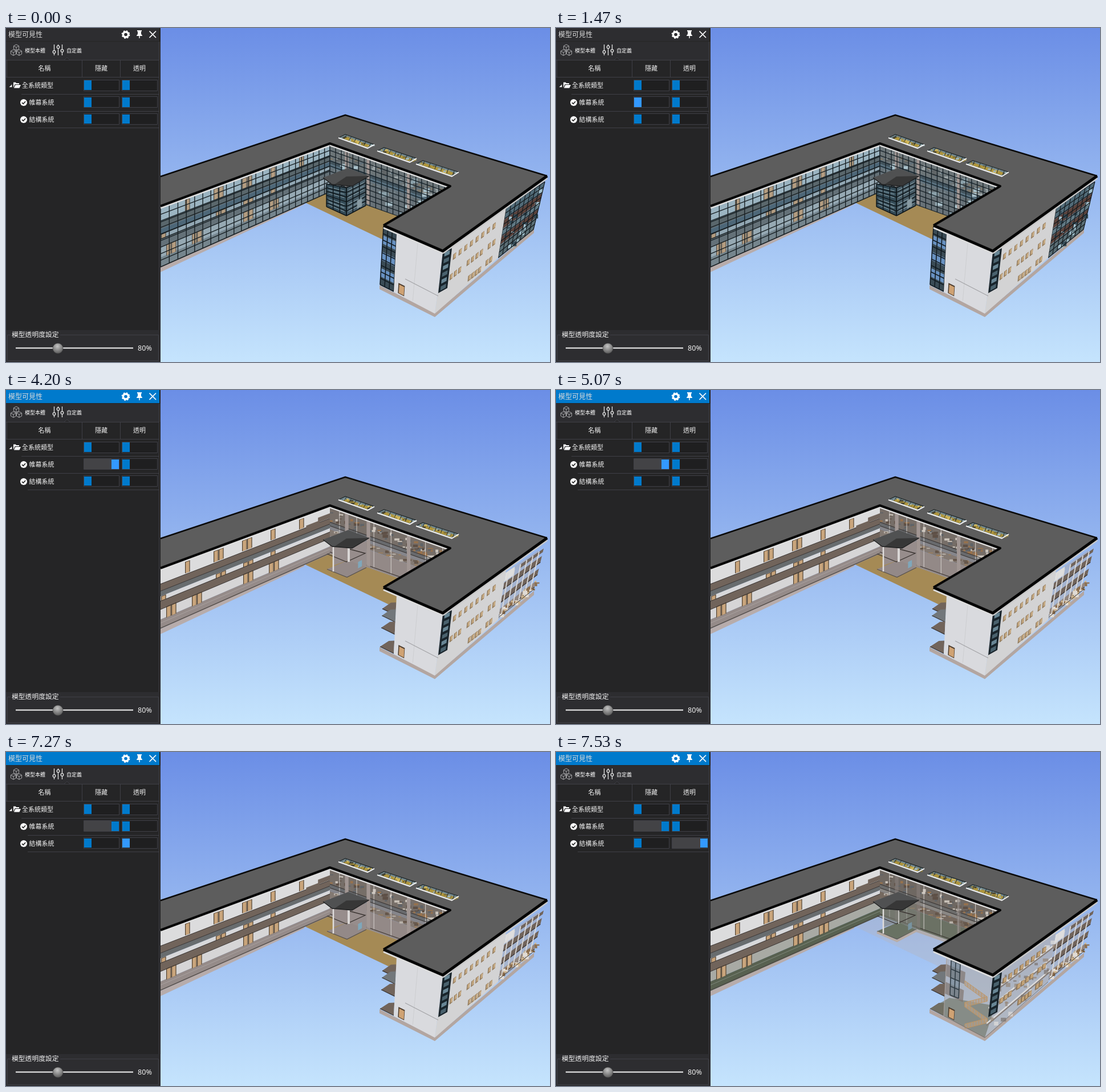
Recreate the animation shown at these times as an HTML page with a canvas. Size 954x587 px, loop 8000 ms.

```html
<!DOCTYPE html>
<html lang="zh-Hant">
<head>
<meta charset="utf-8">
<title>模型可見性</title>
<style>
html, body { margin: 0; width: 100%; height: 100%; overflow: hidden; background: #252526; }
canvas, svg { position: absolute; left: 0; top: 0; }
text { font-family: "Noto Sans CJK TC", "Noto Sans CJK", "Noto Sans", sans-serif; fill: #f1f1f1; font-size: 11px; }
.title { font-size: 12px; fill: #dcdcdc; }
.tab { font-size: 9px; font-weight: 500; fill: #fff; }
.mid { text-anchor: middle; }
.line { fill: none; stroke: #3f3f46; }
.knob { fill: #007acc; }
.trail { fill: #434346; transform-box: fill-box; transform-origin: 0 0; }

#bare, #clear, #bar, .knob, .trail { animation: 8s step-end infinite; }
#bare { animation-name: bare; }
#clear { animation-name: clear; }
#bar { animation-name: focus; }
#k1 { animation-name: hover1, slide1; }
#k2 { animation-name: hover2, slide2; }
#t1 { animation-name: grow1; }
#t2 { animation-name: grow2; }
@keyframes bare { 0% { opacity: 0 } 49.9%, 100% { opacity: 1 } }
@keyframes clear { 0% { opacity: 0 } 91.5%, 100% { opacity: 1 } }
@keyframes focus { 0% { fill: #2d2d30 } 49.9%, 100% { fill: #007acc } }
@keyframes hover1 { 0% { fill: #007acc } 17.4% { fill: #1a8ae6 } 18.3% { fill: #39f } 73.3%, 100% { fill: #007acc } }
@keyframes hover2 { 0% { fill: #007acc } 74%, 100% { fill: #39f } }
@keyframes slide1 {
  0%, 49.9% { transform: translateX(0); animation-timing-function: steps(3) }
  52.4%, 100% { transform: translateX(48px) }
}
@keyframes grow1 {
  0%, 49.9% { transform: scaleX(0); animation-timing-function: steps(3) }
  52.4%, 100% { transform: scaleX(1) }
}
@keyframes slide2 {
  0%, 90.8% { transform: translateX(0); animation-timing-function: steps(4) }
  94%, 100% { transform: translateX(49px) }
}
@keyframes grow2 {
  0%, 90.8% { transform: scaleX(0); animation-timing-function: steps(4) }
  94%, 100% { transform: scaleX(1) }
}
</style>
</head>
<body>
<canvas id="full" width="954" height="587"></canvas>
<canvas id="bare" width="954" height="587"></canvas>
<canvas id="clear" width="954" height="587"></canvas>

<svg width="271" height="587" viewBox="0 0 271 587">
  <defs>
    <radialGradient id="ball" cx=".45" cy=".3" r=".7">
      <stop offset="0" stop-color="#c4c4c4"/><stop offset=".55" stop-color="#8a8a8a"/><stop offset="1" stop-color="#5c5c5c"/>
    </radialGradient>
    <path id="cube" d="M0-5 4.6-2.5V2.8L0 5.3-4.6 2.8V-2.5ZM-4.6-2.5 0 0 4.6-2.5M0 0V5.3"/>
    <path id="slot" d="M.5.5h62v19h-62z" fill="#1f1f20" stroke="#3f3f46"/>
    <g id="check">
      <circle r="6" fill="#fff"/>
      <path d="M-3 0-.8 2.3 3.2-2" fill="none" stroke="#222" stroke-width="1.6"/>
    </g>
    <g id="slots"><use href="#slot" x="136"/><use href="#slot" x="203"/></g>
  </defs>
  <rect width="271" height="587" fill="#252526"/>
  <rect y="24" width="271" height="32" fill="#2d2d30"/>
  <rect y="531" width="271" height="56" fill="#2d2d30"/>
  <rect id="bar" width="269" height="23" fill="#2d2d30"/>

  <text class="title" x="4" y="15.5">模型可見性</text>
  <g fill="none" stroke="#fff">
    <circle cx="210" cy="11.5" r="4.5" stroke-width="3.4"/>
    <circle cx="210" cy="11.5" r="6.4" stroke-width="2" stroke-dasharray="2.6 2.43"/>
    <path d="M251.5 5.500 263 17M263 5.500 251.5 17" stroke-width="1.7"/>
  </g>
  <path d="M230 4h8v2h-1v5q2 1 2 3h-4.300v4h-1.400v-4H229q0-2 2-3V6h-1z" fill="#fff"/>

  <g fill="none" stroke="#a8a8aa">
    <use href="#cube" x="18" y="34"/><use href="#cube" x="13" y="43"/><use href="#cube" x="23" y="43"/>
  </g>
  <text class="tab" x="33" y="42.5">模型本體</text>
  <g fill="#2d2d30" stroke="#e4e4e4" stroke-width="1.3">
    <path d="M84.5 29v19M91.5 29v19M98.5 29v19"/>
    <circle cx="84.5" cy="42" r="2.3"/><circle cx="91.5" cy="33.5" r="2.3"/><circle cx="98.5" cy="40" r="2.3"/>
  </g>
  <text class="tab" x="106" y="42.5">自定義</text>
  <path d="M102 56l5-4 5 4" fill="#252526" stroke="#3f3f46"/>

  <path class="line" d="M0 56.500H268M1.500 57V86M133.500 57V86M200.500 57V86M268.500 24V531M0 86.500H268M27 116.500H268M38 146.500H268M38 175.500H268"/>
  <text class="mid" x="67.5" y="75">名稱</text>
  <text class="mid" x="167" y="75">隱藏</text>
  <text class="mid" x="234" y="75">透明</text>

  <path d="M10.500 99v5h-5z" fill="#e8e8e8"/>
  <path d="M13 105V95.500h4l1 1.500h5v2h-7.500zM16.500 100H26l-2.500 5.500H14z" fill="#fff"/>
  <text x="28" y="104.5">全系統類型</text>
  <use href="#check" x="31" y="131"/>
  <text x="40.5" y="134.5">帷幕系統</text>
  <use href="#check" x="31" y="161"/>
  <text x="40.5" y="164.5">結構系統</text>

  <use href="#slots" y="91"/><use href="#slots" y="120"/><use href="#slots" y="150"/>
  <rect id="t1" class="trail" x="137" y="121" width="48" height="18"/>
  <rect id="t2" class="trail" x="204" y="151" width="49" height="18"/>
  <rect class="knob" x="137" y="92" width="13" height="17"/>
  <rect class="knob" x="204" y="92" width="13" height="17"/>
  <rect class="knob" x="137" y="122" width="13" height="17" id="k1"/>
  <rect class="knob" x="204" y="122" width="13" height="17"/>
  <rect class="knob" x="137" y="152" width="13" height="16"/>
  <rect class="knob" x="204" y="152" width="13" height="16" id="k2"/>

  <path class="line" d="M8 539.500H2.500V584.500H267.500V539.500H95"/>
  <text x="10" y="542.5" style="font-size:11.8px">模型透明度設定</text>
  <path d="M17 562.500H223" stroke="#f4f4f4" stroke-width="2"/>
  <circle cx="91" cy="563" r="9" fill="url(#ball)" stroke="#4c4c4c" stroke-width=".6"/>
  <text x="231" y="567" style="font:12.6px 'Noto Sans',sans-serif">80%</text>
</svg>

<script>
// roof corners
const west = [271, 261], north = [595, 153], east = [949, 260], south = [766, 392],
  tip = [662, 347], inner = [779, 278], court = [568, 203], near = [271, 313];
// wall faces: top left, top right, bottom right, bottom left
const leftFace = [[271, 316], [568, 206], [568, 288], [271, 420]];
const backFace = [[568, 206], [779, 281], [779, 363], [568, 288]];
const strip = [[662, 350], [685, 361], [680, 463], [656, 451]];
const front = [[685, 360], [766, 394], [752, 502], [680, 464]];
const side = [[766, 394], [877, 316], [863, 404], [752, 502]];
const rear = [[877, 316], [945, 270], [925, 354], [863, 404]];
const corner = [[766, 394], [782, 387], [774, 457], [758, 466]];
const entryLeft = [[562, 274], [597, 281], [597, 330], [562, 314]];
const entryRight = [[597, 281], [631, 264], [631, 312], [597, 330]];

const brown = '#71645b', ink = '#3a3431';
const mix = (a, b, t) => a.map((n, k) => n + (b[k] - n) * t);
const at = ([a, b, c, d], u, v) => mix(mix(a, b, u), mix(d, c, u), v);
const down = ([x, y], dy) => [x, y + dy];
const times = (n, fn) => { for (let i = 0; i < n; i++) fn(i); };

// mode 0: curtain wall shown, 1: curtain wall hidden, 2: structure see-through
function scene(id, mode) {
  const g = document.getElementById(id).getContext('2d');
  const open = mode > 0, thin = mode > 1;
  let seed = 7;
  const rnd = () => (seed = seed * 16807 % 2147483647) / 2147483647;

  const trace = pts => {
    g.beginPath();
    pts.forEach(p => g.lineTo(...p));
  };
  const poly = (fill, ...pts) => { trace(pts); g.fillStyle = fill; g.fill(); };
  const line = (color, w, ...pts) => { trace(pts); g.strokeStyle = color; g.lineWidth = w; g.stroke(); };
  const cell = (q, fill, u0 = 0, v0 = 0, u1 = 1, v1 = 1) =>
    poly(fill, at(q, u0, v0), at(q, u1, v0), at(q, u1, v1), at(q, u0, v1));
  const bands = (q, stops, fills) =>
    fills.forEach((f, i) => f && cell(q, f, 0, stops[i], 1, stops[i + 1]));
  const rule = (q, color, w, u0, v0, u1, v1) => line(color, w, at(q, u0, v0), at(q, u1, v1));
  const level = (q, color, w, ...vs) => vs.forEach(v => rule(q, color, w, 0, v, 1, v));
  const grid = (q, cols, rows, color, w, pace = t => t) => {
    times(cols + 1, i => rule(q, color, w, pace(i / cols), 0, pace(i / cols), 1));
    times(rows + 1, i => level(q, color, w, i / rows));
  };
  const scatter = (q, n, fills, v0, v1, w, h) => times(n, i => {
    const [x, y] = at(q, rnd(), v0 + rnd() * (v1 - v0));
    g.fillStyle = fills[i % fills.length];
    g.fillRect(x, y, w * (.4 + rnd()), h * (.4 + rnd()));
  });

  const sky = g.createLinearGradient(0, 0, 0, 587);
  sky.addColorStop(0, '#6b8ee6');
  sky.addColorStop(.5, '#98b9f0');
  sky.addColorStop(1, '#c5e4fd');
  g.fillStyle = sky;
  g.fillRect(0, 0, 954, 587);

  ground();
  leftWing();
  backWing();
  entry();
  rightWing();
  roof();

  function ground() {
    const [, , foot, end] = leftFace, bend = [523, 306];
    poly('#b7acab', end, bend, down(bend, 4), down(end, 9));
    poly(thin ? 'rgba(180,180,190,.4)' : '#a58a55', bend, foot, at(backFace, .6, 1), [684, 383]);
    if (thin) cell(backFace, 'rgba(180,170,164,.8)', .3, .98, .6, 1.07);
  }

  function leftWing() {
    const stops = [0, .24, .36, .45, .53, .67, .84, 1];
    const doors = (x, v0, v1, count) => times(count, i => {
      const u = (x + i * 9 - 271) / 297;
      cell(leftFace, '#4f4031', u, v0, u + .029, v1);
      cell(leftFace, '#c9a57c', u + .004, v0 + .01, u + .025, v1);
    });
    bands(leftFace, stops, open
      ? ['#dcdcdd', brown, '#686c6e', '#d8d8da', brown, thin ? '#a8aaa4' : '#d6d5d6', thin ? '#586150' : '#958b89']
      : ['#a9c2ce', '#566061', '#456070', '#9db2bc', '#626d70', '#a2b4bc', '#78868c']);
    times(5, i => {
      doors(314 + i * 50, .02, .22, i % 4 && i < 3 ? 2 : 1);
      if (i !== 1) doors(272 + i * 48, .45, .53, i % 4 ? 2 : 1);
      if (i !== 2) doors(281 + i * 45, .66, .85, 2);
    });
    if (open) {
      level(leftFace, ink, 1, .24, .36, .53, .67);
      level(leftFace, thin ? '#7f887b' : '#aaa2a0', 1, .9);
      level(leftFace, '#4a4542', 1.2, .985);
      for (const u of [.86, .93]) cell(leftFace, brown, u, .2 - (u - .86), u + .08, .3 - (u - .86));
    } else {
      cell(leftFace, 'rgba(105,130,145,.22)');
      grid(leftFace, 24, 9, '#182024', 1.4, t => t * (1.25 - .25 * t));
      level(leftFace, '#182024', 1.5, .24, .45, .53);
    }
    line('#dedede', 3.5, leftFace[0], leftFace[1]);
  }

  function backWing() {
    const stops = [0, .32, .4, .47, .62, 1];
    bands(backFace, stops, thin ? ['#6f6862', '#6c6c6b', '#8a8783', '#75695f', '#6b7164']
      : ['#766e68', '#686a6d', '#85858a', '#837972', '#938987']);
    scatter(backFace, 90, ['#97724d', '#5e5046', '#c9c2b9', '#606468'], .08, .3, 7, 4);
    scatter(backFace, 45, ['#a0805c', '#65564a', '#b9b2aa'], .46, .62, 7, 3);
    if (open) {
      times(7, i => rule(backFace, 'rgba(222,218,215,.75)', 1.2, i / 7 + .08, 0, i / 7 + .08, .97));
      level(backFace, ink, 1.2, .32, .4, .96);
    } else {
      bands(backFace, stops, ['rgba(95,125,140,.45)', '#42535d', '#57707f', 'rgba(90,112,124,.7)', 'rgba(88,106,114,.75)']);
      scatter(backFace, 30, ['#a9c1cb', '#8ba1aa'], .05, .95, 9, 6);
    }
    for (const u of [.125, .305, .64]) cell(backFace, thin ? 'rgba(135,127,123,.6)' : '#a19693', u, .02, u + .03, .97);
    if (!open) grid(backFace, 21, 9, '#162026', 1.3);
    line('#dedede', 3, backFace[0], backFace[1]);
  }

  function entry() {
    const a = [556, 263], b = [600, 246], c = [637, 260], d = [607, 278], e = [572, 275];
    if (open) {
      const floor = [[600, 299], [632, 312], [598, 329], [563, 315]];
      poly(thin ? 'rgba(122,124,117,.6)' : '#978d8c', [575, 278], [632, 266], floor[1], floor[0], [575, 308]);
      cell(floor, thin ? '#697263' : '#938988');
      line('#57514e', 1.3, floor[3], floor[2], floor[1]);
      line(ink, 1.3, [563, 288], [597, 302], [630, 287], [600, 279]);
      line('#e0dedd', 2.5, [574, 276], [574, 319]);
      line('#dad7d6', thin ? 1.5 : 4, [601, 276], [601, 302]);
      cell(entryRight, thin ? '#7893a0' : '#7fa7bb', .6, .65, .8, .88);
      if (thin) line('#b9ada6', 4, down(floor[3], 2), down(floor[2], 3), down(floor[1], 2));
    } else {
      cell(entryLeft, '#344b57');
      cell(entryRight, '#475b66');
      for (const face of [entryLeft, entryRight]) {
        times(7, i => rule(face, '#88a0aa', 1.1, .1, (i + 1) / 8, .9, (i + 1) / 8));
        grid(face, 3, 6, '#0f171b', 1.5);
      }
      cell(entryRight, '#8799a1', .55, .65, .8, .95);
    }
    poly('#505152', a, b, c, d, e);
    poly('#373737', [576, 275], [597, 261], c, d);
    line('#202122', 1.3, a, e, d, c);
  }

  function rightWing() {
    const base = [[655, 452], [752, 501], [926, 353]];
    poly('#b3a6a1', ...base, ...base.map(p => down(p, 7)).reverse());
    (open ? openEnds : glassEnds)();
    if (thin) inside();
    else {
      cell(front, '#d9dade');
      cell(side, '#d3d3d4');
      rule(front, '#cdced1', 1, .46, 0, .46, .98);
      line('#a3a3a6', 1.2, [700, 441], [758, 471]);
    }
    cell(front, '#4a3a2c', .1, .81, .25, .98);
    cell(front, '#cfa273', .12, .83, .24, .97);

    windows(8, 787, 401, 9.9);
    windows(4, 811, 412, 7.7);
    windows(2, 848, 383, 8);
    windows(3, 781, 437, 7.5);
    windows(4, 813, 439, 6);
    windows(2, 844, 412, 6.5);

    cell(corner, '#19242b');
    times(6, i => cell(corner, i % 2 ? '#4a626e' : '#688695', .22, i / 6 + .03, .8, i / 6 + .13));
    line('#dcdcdc', 3, down(tip, 4), down(south, 4));
    line('#c8c8c8', 3, down(south, 4), down(east, 4));
  }

  function windows(n, x, y, dx) {
    const r = thin ? 3.4 : 2.5;
    times(n, i => {
      const cx = x + i * dx, cy = y - i * dx * .76;
      const pane = [[cx - r, cy - 3], [cx + r, cy - 7], [cx + r - 1, cy + 3], [cx - r - 1, cy + 7]];
      cell(pane, '#8d7557');
      cell(pane, thin ? '#c3a378' : '#c7ab84', .3, .08, 1, .85);
    });
  }

  function glassEnds() {
    times(7, i => cell(strip, i % 2 ? '#6790c0' : '#3a4b55', 0, i / 7, 1, (i + 1) / 7));
    grid(strip, 3, 9, '#121b21', 1.6);
    bands(rear, [0, .24, .42, .57, .74, 1], ['#516b78', '#5b423b', '#627b86', '#5b423b', '#5a6e75']);
    scatter(rear, 20, ['#9fbecb', '#344b57'], .05, .9, 7, 6);
    grid(rear, 8, 9, '#141a1e', 1.2);
  }

  function openEnds() {
    [.34, .46, .67, 1].forEach((v, i) => {
      poly(i === 1 ? '#72777b' : brown, at(strip, 0, v), at(strip, .6, v - .17), at(strip, 1, v - .22), at(strip, 1, v));
      rule(strip, ink, 1.2, 0, v, 1, v);
    });
    cell(rear, 'rgba(170,165,165,.45)', 0, .05, .85, 1);
    cell(rear, '#dedede', 0, .06, .24, .24);
    times(3, i => {
      const v = .22 + i * .26;
      cell(rear, i < 2 ? brown : '#92867f', 0, v + .04, 1, v + .17);
      level(rear, ink, 1.2, v + .17);
    });
    cell(rear, brown, .4, .1, 1, .18);
    scatter(rear, 34, ['#d0b58d', '#8d6e4c', '#e4ddd4'], .74, .92, 6, 5);
    times(6, i => rule(rear, '#dcdad9', 1.8, .08 + i * .16, .1, .08 + i * .16, .93));
    level(rear, ink, 1, .95);
  }

  function inside() {
    cell(front, 'rgba(176,173,174,.68)');
    cell(side, 'rgba(176,172,172,.68)');
    poly('rgba(112,118,104,.65)', strip[3], [690, 432], [770, 446], front[2], front[3]);
    for (const v of [.12, .42]) cell(front, 'rgba(128,118,112,.7)', 0, v, .42, v + .2);
    const pane = [[693, 366], [709, 373], [706, 433], [691, 427]];
    cell(pane, 'rgba(110,130,145,.6)');
    grid(pane, 2, 4, '#303c44', 1.6);

    const turn = i => [i % 2 ? 756 : 717, 402 + 19 * i + i % 2 * 9];
    times(4, i => {
      const flight = [turn(i), turn(i + 1), down(turn(i + 1), 8), down(turn(i), 8)];
      cell(flight, 'rgba(175,160,145,.7)');
      grid(flight, 8, 1, '#c2955f', .9);
    });
    for (const v of [.27, .52, .77]) {
      level(side, '#dddcdc', 2.5, v);
      level(side, '#857b75', 2, v + .035);
    }
    scatter(side, 40, ['rgba(150,135,120,.7)', 'rgba(225,222,220,.7)', 'rgba(115,105,98,.6)'], .1, .92, 7, 6);
    line('#77716d', 1, strip[3], front[2], side[2]);
    line('#aaa29f', 1, front[0], front[3]);
  }

  function roof() {
    poly('#5d5d5d', west, north, east, south, tip, inner, court, near);
    g.lineJoin = 'round';
    line('#0a0a0a', 2.8, west, north, east);
    line('#050505', 4, near, court, inner, tip);
    line('#050505', 5, tip, south, east);
    times(3, i => skylight(583 + i * 68, 193 + i * 23, 63 + i * 6));
  }

  function skylight(x, y, w) {
    const q = [[x + 12, y - 6], [x + w, y + w * .19], [x + w - 12, y + w * .29], [x, y]];
    cell(q, '#71868d');
    cell(q, '#b0963c', .12, .35, .95, .85);
    scatter(q, 16, ['#cfb65a', '#4a4530', '#8a7a3c', '#9db4bb'], .2, .75, 5, 2.4);
    times(6, i => rule(q, '#252c2c', 1, i / 6 + .05, .05, i / 6 + .15, .8));
    line('#1d2425', 1.3, q[3], q[0], q[1]);
    line('#f0f0f0', 2, q[3], q[2], q[1]);
  }
}

['full', 'bare', 'clear'].forEach(scene);
</script>
</body>
</html>
```
